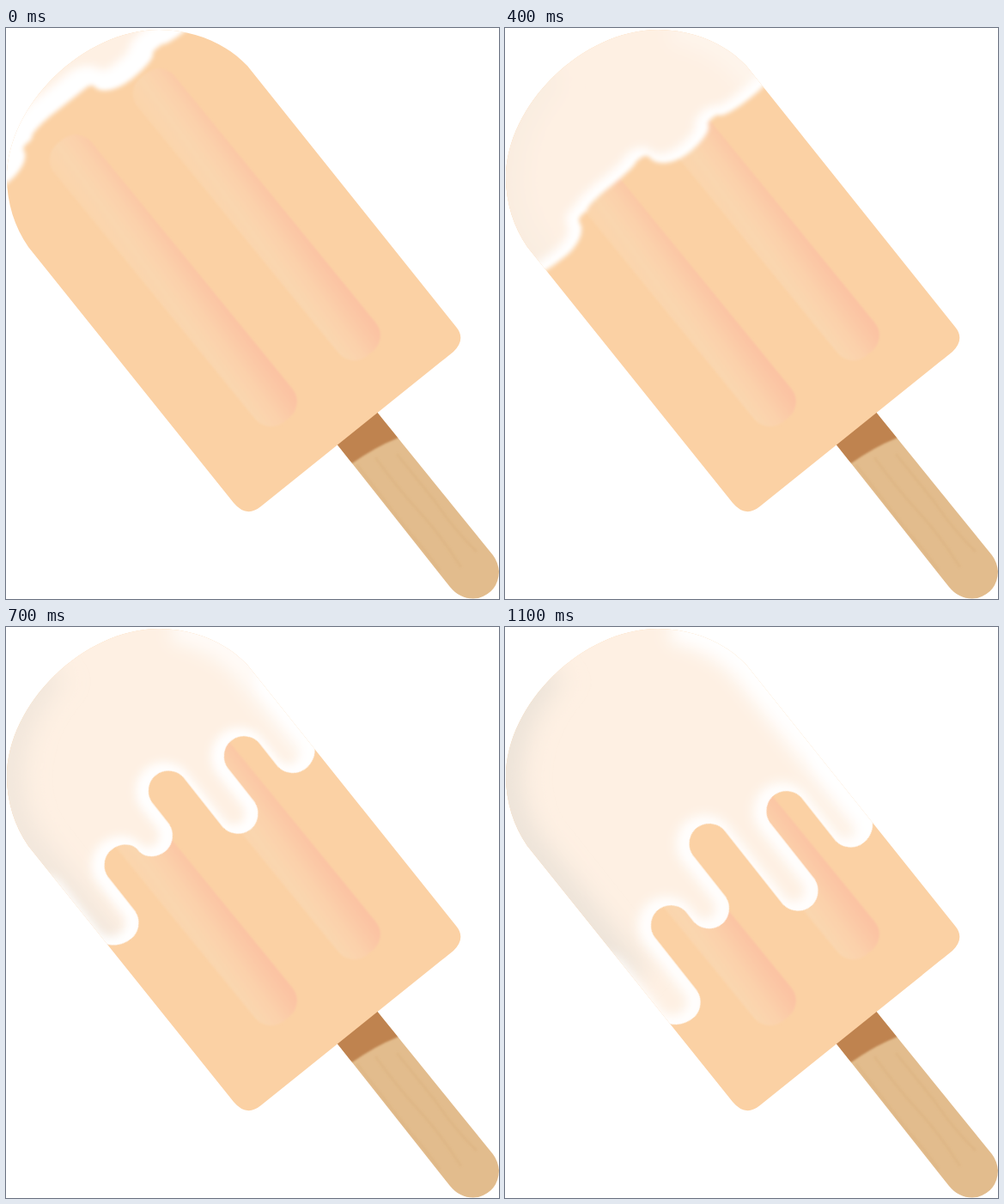
An HTML page that plays this animation: 574 by 665 pixels, repeating every 8000 ms.

```html
<!DOCTYPE html>
<html lang="en">
<head>
<meta charset="utf-8">
<title>Ice lolly</title>
<style>
html, body { margin: 0; width: 100%; height: 100%; overflow: hidden; background: #fff; }
svg { display: block; width: 574px; height: 665px; }
</style>
</head>
<body>
<svg viewBox="0 0 574 665">
  <defs>
    <path id="body" d="M281 44 L524 348 Q536 362 521 377 L297 557 Q280 571 265 553 L26 255 C10 232 1 203 1 175 C1 89 91 2 178 2 C222 2 258 20 281 44Z"/>
    <path id="stick" d="M380 478 L517 651 Q530 667 550 664 Q573 657 574 633 Q573 622 567 614 L426 440Z"/>
    <path id="ice"/>
    <clipPath id="inBody"><use href="#body"/></clipPath>
    <clipPath id="inStick"><use href="#stick"/></clipPath>
    <clipPath id="inIce"><use href="#ice"/></clipPath>
    <linearGradient id="hollow" gradientUnits="userSpaceOnUse" x1="0" y1="0" x2="4.6" y2="79.7">
      <stop offset="0" stop-color="#fbd4aa"/>
      <stop offset=".3" stop-color="#fad6af"/>
      <stop offset=".55" stop-color="#fbd1ab"/>
      <stop offset=".75" stop-color="#fbc9a6"/>
      <stop offset=".92" stop-color="#fbc3a3"/>
    </linearGradient>
    <filter id="soft"><feGaussianBlur stdDeviation="1.2"/></filter>
    <g id="blurs"></g>
  </defs>

  <use href="#stick" fill="#e2bc8d"/>
  <g clip-path="url(#inStick)" filter="url(#soft)">
    <path d="M408 508 L470 588 Q490 610 505 632 M430 500 Q455 535 480 562 T530 628 M455 496 L500 552 Q520 582 548 610" fill="none" stroke="#d2a46f" stroke-width="3" opacity=".22"/>
  </g>
  <g clip-path="url(#inStick)">
    <path d="M360 490 L430 425 L475 466 L455 478 Q430 488 403 507Z" fill="#bf834f" filter="url(#soft)"/>
  </g>

  <use href="#body" fill="#fbd1a4"/>
  <g fill="url(#hollow)" filter="url(#soft)">
    <rect id="groove" width="418" height="56" rx="24" transform="matrix(.632 .775 .775 -.632 138 73)"/>
    <use href="#groove" x="-97" y="77"/>
  </g>

  <g clip-path="url(#inBody)">
    <g class="tilt" filter="url(#edgeBlur)">
      <use href="#ice" fill="#fef0e3"/>
      <g clip-path="url(#inIce)" fill="none">
        <g filter="url(#shadeBlur)"><path class="tilt shade" d="M150 410 L26 255 C10 232 1 203 1 175 C1 125 25 80 55 50" stroke="#e9e1d7" stroke-width="32"/></g>
        <g filter="url(#rimBlur)"><path class="tilt shade" d="M195 -3 Q250 8 281 43 L524 347" stroke="#fff" stroke-width="42"/></g>
        <g filter="url(#glowBlur)"><path id="glow" stroke="#fff" transform="translate(-3 -4)"/></g>
      </g>
    </g>
  </g>
</svg>
<script>
const $ = id => document.getElementById(id);
const clamp = x => Math.min(1, Math.max(0, x));
const mix = (a, b, k) => a + (b - a) * k;

// Local axes: first along the lolly, second across it. The matrix is its own inverse.
for (const el of document.querySelectorAll('.tilt'))
  el.setAttribute('transform', 'matrix(.6204 .7843 .7843 -.6204 0 0)');

$('blurs').innerHTML = [['edgeBlur', 1], ['shadeBlur', 15], ['rimBlur', 10], ['glowBlur', 5]].map(([id, d]) =>
  `<filter id="${id}" filterUnits="userSpaceOnUse" x="-150" y="-350" width="1000" height="800">
    <feGaussianBlur stdDeviation="${d}"/></filter>`).join('');

// Drips and notches alternate at even spacing, right to left.
const R = 24;
const ripple = [6, 1, 11, -14, -14, -6, 16];
const drips = [43, -65, 63, -91, 15, -44, 80];
const across = [225, ...drips.map((_, i) => 171 - 47 * i), -170];

// Mean depth of the icing and how far its ripples have become drips, every second step from -1.
const front = [96, 162, 205, 263, 313, 382, 413];
const split = [0, 0, 0, .15, .72, .91, 1];

function track(keys, step) {
  const x = (step + 1) / 2, i = Math.floor(x), f = x - i;
  const [a, b, c, d] = [-1, 0, 1, 2].map(n => keys[Math.min(keys.length - 1, Math.max(0, i + n))]);
  return b + f / 2 * (c - a + f * (2 * a - 5 * b + 4 * c - d + f * (3 * (b - c) + d - a)));
}

// Each side of a drip is a rounded notch, a straight run and a rounded tip.
function edgePath(depths, drop, widen) {
  const u = [depths[0] - drop, ...depths, depths[6] - drop];
  let d = `M${u[0]} ${across[0]}`;
  for (let i = 0; i < 8; i++) {
    const [u0, u1, v0, v1] = [u[i], u[i + 1], across[i], across[i + 1]];
    const w = i % 2 ? -widen : widen;
    const m = (v0 + v1) / 2 + w;
    const scale = Math.sign(u1 - u0) * Math.min(1, Math.abs(u1 - u0) / (2 * R));
    const r0 = (R - w) * scale, r1 = (R + w) * scale;
    d += `C${u0} ${mix(v0, m, .55)} ${u0 + r0 * .45} ${m} ${u0 + r0} ${m}L${u1 - r1} ${m}`
       + `C${u1 - r1 * .45} ${m} ${u1} ${mix(v1, m, .55)} ${u1} ${v1}`;
  }
  return d;
}

function draw(step) {
  const mean = track(front, step), k = track(split, step);
  const firm = clamp((step - 5) / 2);
  const depths = drips.map((d, i) => mean + mix(ripple[i], d, k));
  const edge = edgePath(depths, mix(8, 120, firm), mix(15, 0, firm));
  const blur = (id, v) => $(id).firstElementChild.setAttribute('stdDeviation', v);

  $('ice').setAttribute('d', edge + 'L0 -170 L0 225Z');
  $('glow').setAttribute('d', edge);
  $('glow').setAttribute('stroke-width', Math.min(20, 12 + 2 * step) + 34 * Math.exp(-3 * step));
  blur('glowBlur', 4 + step * .2);
  blur('edgeBlur', mix(2.8, .4, firm));
  for (const el of document.querySelectorAll('.shade'))
    el.setAttribute('opacity', clamp((step - 2) / 7));
}

const start = performance.now();
let shown = -1;
function tick() {
  const t = (performance.now() - start) % 8000;
  const step = Math.min(11, Math.floor(t / 100));
  if (step !== shown) draw(shown = step);
  requestAnimationFrame(tick);
}
tick();
</script>
</body>
</html>
```
